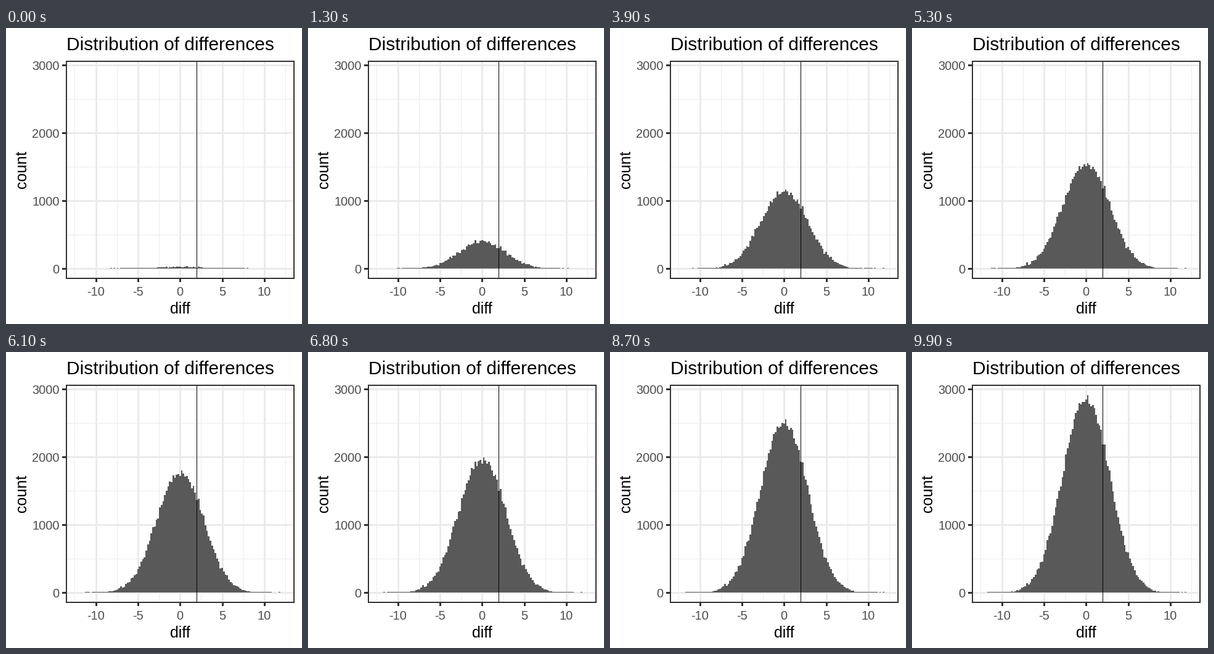
A matplotlib script that plays this animation: 480 by 480 pixels, repeating every 10 s.

```python
import numpy as np
import matplotlib.pyplot as plt
from matplotlib.animation import FuncAnimation
from matplotlib.patches import Polygon, Rectangle

SIZE, DPI, FRAMES = 480, 100, 100
X0, Y0 = 282.75, 390.5         # pixel position of the data origin
SX, SY = 13.665, 0.11          # pixels per unit of diff and of count
BIN, SD, DRAWS = 0.2, 2.77, 1000
INK, GRID, BAR, LABEL = "#333333", "#ebebeb", "#595959", "#4d4d4d"

plt.rcParams["font.family"] = "Liberation Sans"
fig = plt.figure(figsize=(SIZE / DPI, SIZE / DPI), dpi=DPI, facecolor="white")
ax = fig.add_axes([0, 0, 1, 1])
ax.set(xlim=(0, SIZE), ylim=(SIZE, 0))
ax.axis("off")


def box(x, y, w, h, color, z=1):
    ax.add_patch(Rectangle((x, y), w, h, fc=color, lw=0, zorder=z,
                           antialiased=False, snap=False))


def text(x, y, s, px, color="black", **kw):
    kw = {"ha": "center", "va": "baseline", **kw}
    ax.text(x, y, s, fontsize=px * 72 / DPI, color=color, zorder=6, **kw)


def col(v):
    return np.floor(X0 + v * SX)


def row(n):
    return np.floor(Y0 - n * SY)


# Grid, ticks and tick labels
for v in np.arange(-12.5, 13, 5):
    box(col(v), 54, 1, 352, GRID)
for n in (500, 1500, 2500):
    box(98, row(n), 369, 1, GRID)
for v in range(-10, 11, 5):
    box(col(v) - 1, 54, 3, 352, GRID)
    box(col(v) - 1, 407, 3, 5, INK)
    text(col(v), 434, str(v), 20, LABEL)
for n in range(0, 3001, 1000):
    box(98, row(n) - 1, 369, 3, GRID)
    box(91, row(n) - 1, 6, 3, INK)
    text(86.5, row(n) + 8, str(n), 20, LABEL, ha="right")

# Panel border and reference line
box(309, 54, 1, 352, "black", 4)
for x in (97, 466):
    box(x, 53, 2, 354, INK, 5)
for y in (53, 405):
    box(97, y, 371, 2, INK, 5)

text(97.5, 36, "Distribution of differences", 29.9, ha="left")
text(282, 463, "diff", 25)
text(37.5, 229.5, "count", 25, rotation=90, ha="right", va="center")

# Every step adds a batch of normal draws to the running histogram
rng = np.random.default_rng(12)
edges = (np.arange(-62, 64) - 0.5) * BIN
batches = rng.normal(0, SD, (FRAMES, DRAWS))
counts = np.cumsum([np.histogram(b, edges)[0] for b in batches], axis=0)

xs = np.repeat(col(edges), 2)
base = row(0)
bars = Polygon(np.column_stack([xs, np.full(xs.size, base)]), fc=BAR, lw=0,
               zorder=3, antialiased=False, snap=False)
ax.add_patch(bars)


def draw(i):
    n = counts[i]
    # Bins in use are at least one pixel tall
    tops = np.where(n > 0, np.minimum(np.round(Y0 - n * SY), base - 1), base)
    ys = np.concatenate([[base], np.repeat(tops, 2), [base]])
    bars.set_xy(np.column_stack([xs, ys]))
    return (bars,)


anim = FuncAnimation(fig, draw, frames=FRAMES, interval=100,
                     repeat=True, repeat_delay=0)
plt.show()
```
